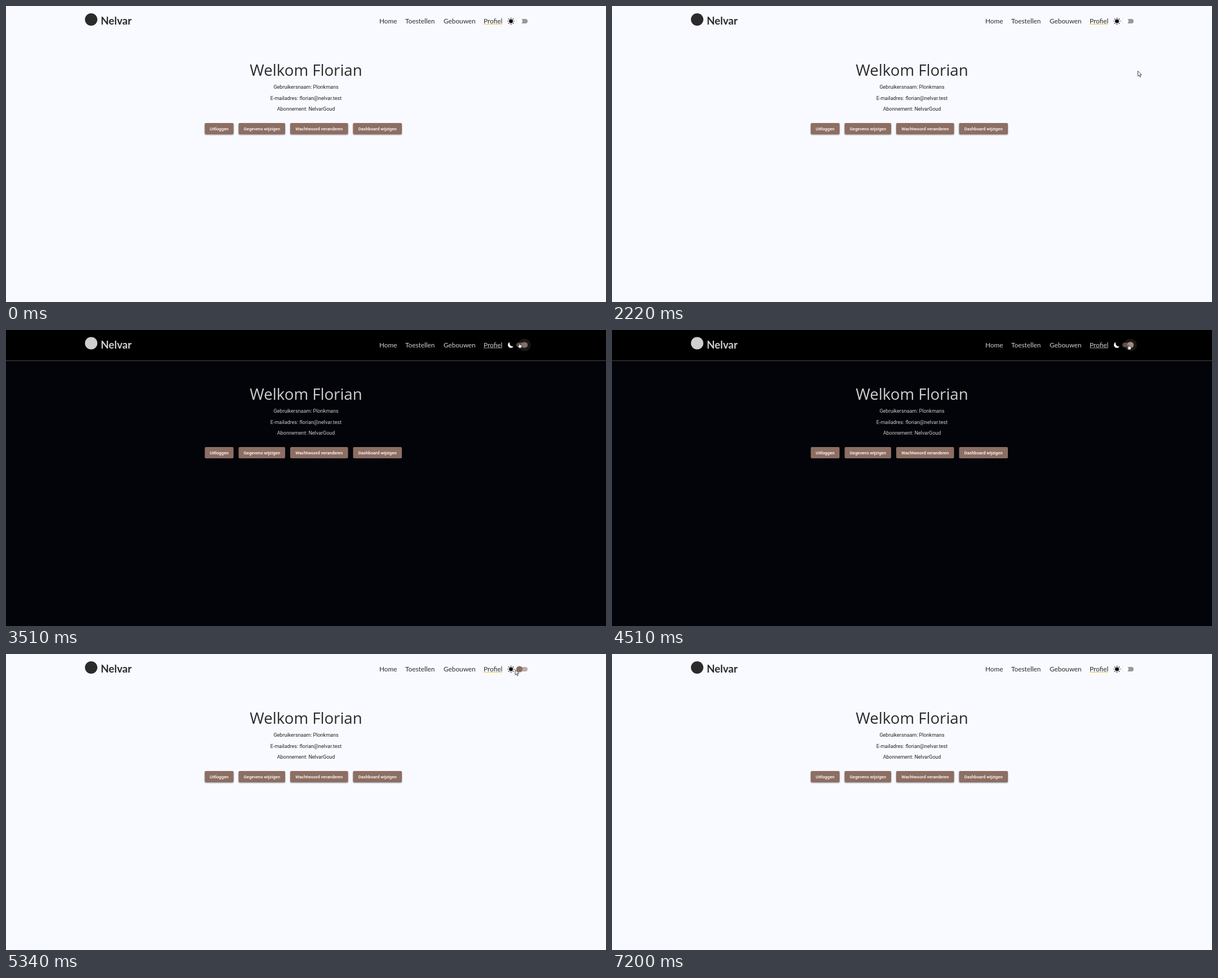
These frames come from a looping animation (1064x526 px, 7.53 s). An HTML page:

```html
<!DOCTYPE html>
<html lang="nl">
<head>
<meta charset="utf-8">
<title>Profiel</title>
<style>
  html, body { margin: 0; width: 100%; height: 100%; overflow: hidden; }
  svg {
    --page: #f9faff; --rule: transparent; --bar: #f9faff; --ink: #2b2b2b; --body: #222;
    --underline: #f5c04a; --accent: #8d6e63; --track: #98999c; --ripple: #000; --shadow: rgba(0,0,0,.42);
    display: block; width: 100%; height: 100%; background: var(--page);
  }
  svg.dark {
    --page: #030409; --rule: #45433f; --bar: #000; --ink: #cfcfcf; --body: #ccc;
    --underline: #a1887f; --accent: #a1887f; --track: #777; --ripple: #a1887f; --shadow: transparent;
  }
  .ink { fill: var(--ink); }
  .brand { font: 700 18.7px Lato, sans-serif; }
  .nav { font: 11.8px Lato, sans-serif; }
  .title { font: 27.6px "Open Sans", sans-serif; text-anchor: middle; }
  .line { font: 9px Roboto, sans-serif; text-anchor: middle; fill: var(--body); }
  .button rect { fill: #8d6e63; filter: drop-shadow(0 1px .8px var(--shadow)); }
  .button text { font: 500 7.75px Roboto, sans-serif; text-anchor: middle; fill: #fff; }
  .dark .light-only, svg:not(.dark) .dark-only { display: none; }
  .knob { fill: #fff; filter: drop-shadow(0 .6px .6px rgba(0,0,0,.22)); }
  .accent { fill: var(--accent); }
  .pointer { fill: #fff; stroke: #1c1c1c; stroke-width: .8; stroke-linejoin: round; }
</style>
</head>
<body>
<svg id="stage" viewBox="0 0 1064 526">
  <rect width="1064" height="54" fill="var(--bar)"/>
  <rect y="54" width="1064" height="1" fill="var(--rule)"/>
  <g id="header">
    <circle class="ink" cx="151" cy="24" r="11"/>
    <text class="ink brand" x="168" y="33">Nelvar</text>
    <g id="nav"></g>
    <rect x="847" y="32" width="33" height="1" fill="var(--underline)"/>
    <g class="light-only" transform="translate(895.5 27)">
      <circle r="3.4"/>
      <g id="rays"></g>
    </g>
    <path class="dark-only" fill="#fff" d="M893.1 22A5.4 5.4 0 1 0 899.9 29.9A6.3 6.3 0 0 1 893.1 22Z"/>
    <rect id="trackOff" x="905" y="23" width="20" height="8" rx="4" fill="var(--track)"/>
    <rect id="trackOn" x="905" y="23" width="20" height="8" rx="4" class="accent"/>
    <g id="thumb">
      <circle class="knob light-only" r="5.5"/>
      <circle id="thumbOn" class="accent" r="5.6"/>
      <circle id="ripple" r="11" fill="var(--ripple)"/>
    </g>
  </g>

  <text class="ink title" x="532" y="124">Welkom Florian</text>
  <text class="line" x="532" y="147">Gebruikersnaam: Plonkmans</text>
  <text class="line" x="532" y="166.5">E-mailadres: florian@nelvar.test</text>
  <text class="line" x="532" y="186">Abonnement: NelvarGoud</text>
  <g id="buttons"></g>

  <g id="cursor">
    <path id="arrow" class="pointer" d="M0 0V9.2L2.2 7.2L3.7 10.7L5.2 10L3.7 6.7H6.6Z"/>
    <path id="hand" class="pointer" d="M2.3 5V1Q3.1 -.2 3.9 1V3.2Q5 2.6 5.4 3.5Q6.3 3.1 6.6 4Q7.6 3.8 7.6 5V6.6L6.5 9H3L.4 5.8Q.7 4.5 2.3 5.7Z"/>
  </g>
</svg>
<script>
const LOOP = 7530, REFRESH = 86;
const ENTER = 1180, DARK = 3510, LIGHT = 5340, EXIT = 7200;

const el = id => document.getElementById(id);
const set = (id, name, value) => el(id).setAttribute(name, value);
const show = (id, visible) => { el(id).style.display = visible ? '' : 'none'; };
const progress = (t, from, to) => Math.min(1, Math.max(0, (t - from) / (to - from)));
const ease = (t, from, to) => {
  const p = progress(t, from, to);
  return p * p * (3 - 2 * p);
};

function build() {
  const links = { Home: 662, Toestellen: 708, Gebouwen: 776, Profiel: 847 };
  el('nav').innerHTML = Object.entries(links)
    .map(([label, x]) => `<text class="ink nav" x="${x}" y="31">${label}</text>`).join('');

  const widths = {
    'Uitloggen': 51, 'Gegevens wijzigen': 82.5, 'Wachtwoord veranderen': 102.5, 'Dashboard wijzigen': 86.5
  };
  let x = 352.5;
  for (const [label, width] of Object.entries(widths)) {
    el('buttons').innerHTML += `<g class="button"><rect x="${x}" y="208" width="${width}" height="20" rx="2"/>
      <text x="${x + width / 2}" y="220.5">${label}</text></g>`;
    x += width + 9;
  }

  for (let angle = 0; angle < 360; angle += 45)
    el('rays').innerHTML += `<circle cx="5.4" r=".8" transform="rotate(${angle})"/>`;
}

// In from below, a short drag on the switch, then out again.
function cursorAt(t) {
  const nudge = ease(t, 4080, 4260), drag = ease(t, 4600, 5190), leave = ease(t, 5550, EXIT);
  return [
    1002 - 95 * ease(t, 1350, 2670) + 6 * nudge - 10 * drag + 135 * leave,
    23 + 491 * (1 - progress(t, ENTER, 2930)) ** 1.85 + 3 * nudge + 2 * drag + 499 * leave
  ];
}

function draw(time) {
  const dark = time >= DARK && time < LIGHT;
  el('stage').classList.toggle('dark', dark);
  set('header', 'transform', `translate(0 ${dark ? -.5 : 0})`);

  // Motion is seen in refresh steps; the theme switches exactly on time.
  const t = DARK + Math.floor((time - DARK) / REFRESH + .07) * REFRESH;

  const overToggle = t >= 2800 && t < 5130;
  set('cursor', 'transform', `translate(${cursorAt(t)})`);
  show('cursor', time >= ENTER && time < EXIT);
  show('hand', overToggle);
  show('arrow', !overToggle);

  const checked = ease(t, 3420, 3600) - ease(t, 5350, 5520);
  set('thumbOn', 'opacity', checked);
  set('trackOn', 'opacity', checked * .55);
  set('trackOff', 'opacity', 1 - checked);

  const thumbX = 910.5 + 9 * (ease(t, 3430, DARK) - ease(t, 4600, 5100));
  const hover = .06 * ease(t, 2760, 2900), press = .11 * ease(t, 3340, 3420);
  set('thumb', 'transform', `translate(${thumbX} 27)`);
  set('ripple', 'opacity', (hover + press) * (1 - ease(t, 5090, 5200)));
}

function frame(now) {
  draw(now % LOOP);
  requestAnimationFrame(frame);
}

build();
draw(0);
requestAnimationFrame(frame);
</script>
</body>
</html>
```
